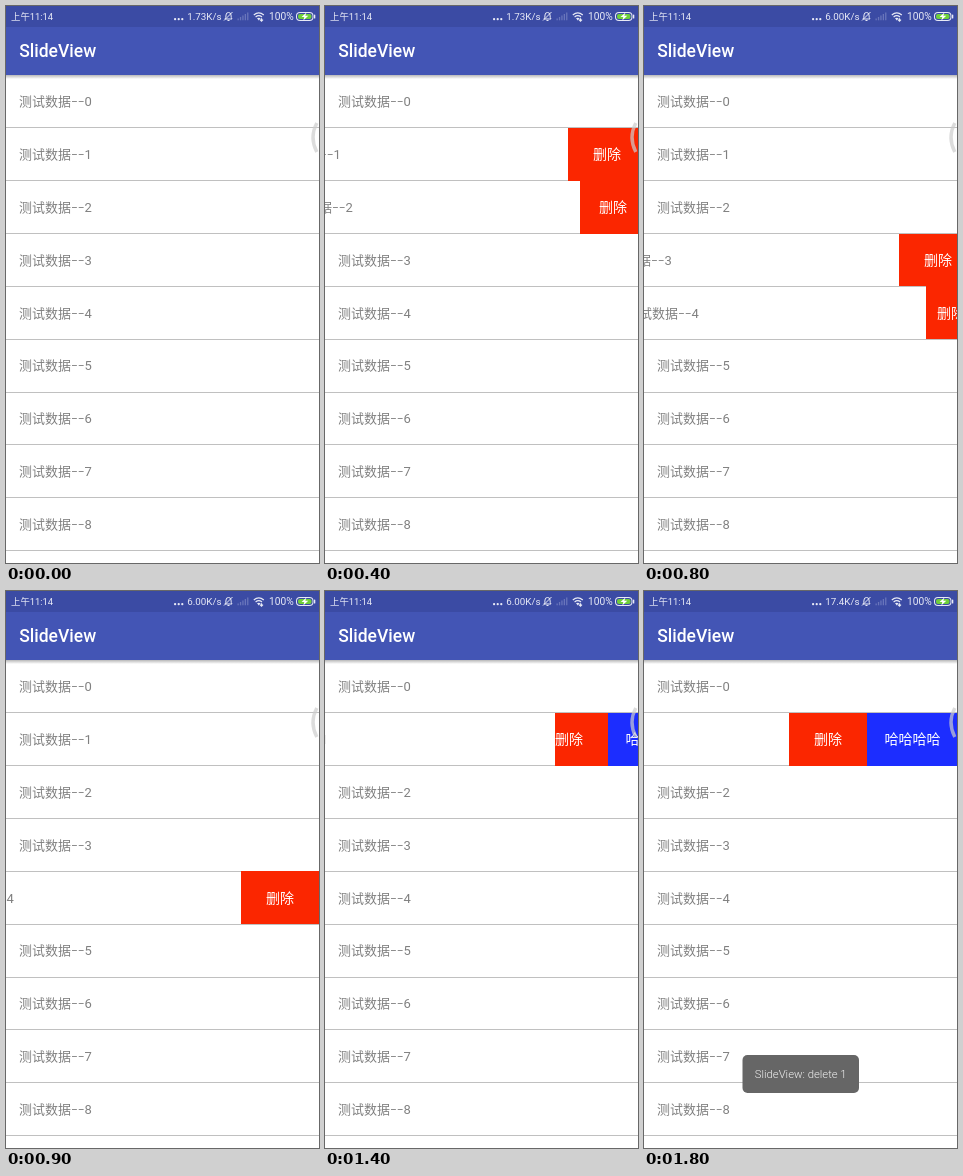
An HTML page with a canvas that plays this animation: 313x557 px, repeating every 1.9 s.

```html
<!DOCTYPE html>
<html lang="zh-CN">
<head>
<meta charset="utf-8">
<title>SlideView</title>
<style>
html, body { margin: 0; width: 100%; height: 100%; overflow: hidden; background: #fff; }
canvas { display: block; }
</style>
</head>
<body>
<canvas id="stage" width="313" height="557"></canvas>
<script>
const W = 313, H = 557, TICK = 100, TICKS = 19;
const LIST_TOP = 69, ROW = 52.85, RED_WIDTH = 78, BLUE_WIDTH = 90;
const FONT = 'Roboto, "Noto Sans CJK SC", "Noto Sans CJK", sans-serif';
const ctx = document.getElementById('stage').getContext('2d');

// Each swipe: row, first tick, distance pulled left on every tick from there.
const swipes = [
  { row: 0, start: 1, pull: [40, 74, 12] },
  { row: 1, start: 3, pull: [150, 70] },
  { row: 2, start: 4, pull: [58, 78, 24] },
  { row: 3, start: 6, pull: [90, 160, 58] },
  { row: 4, start: 8, pull: [31, 78, 46] },
  { row: 1, start: 11, pull: [16, 38, 60, 83, 125, 168, 168, 168] },
];

const rowTop = i => LIST_TOP + i * ROW;

function text(str, x, y, size, color, { weight = 400, align = 'left' } = {}) {
  ctx.font = `${weight} ${size}px ${FONT}`;
  ctx.textAlign = align;
  ctx.fillStyle = color;
  ctx.fillText(str, x, y);
}

function rect(x, y, w, h, color, radius = 0) {
  ctx.fillStyle = color;
  ctx.beginPath();
  ctx.roundRect(x, y, w, h, radius);
  ctx.fill();
}

function stroke(path, color, width) {
  ctx.strokeStyle = color;
  ctx.lineWidth = width;
  ctx.stroke(new Path2D(path));
}

function fill(path, color) {
  ctx.fillStyle = color;
  ctx.fill(new Path2D(path));
}

function statusBar(tick) {
  const speed = tick < 6 ? '1.73K/s' : tick < 16 ? '6.00K/s' : '17.4K/s';
  const light = '#e8eaf6', back = '#3b4ba4';
  rect(0, 0, W, 21, back);
  text('上午11:14', 5, 14, 9.4, light);
  for (let i = 0; i < 3; i++) rect(168 + i * 3.6, 12, 2.2, 2.2, light, 1);
  text(speed, 215.5, 14, 9.8, light, { align: 'right' });
  stroke('M219 13h7q-1-1-1-4q0-2.5-2.5-2.5t-2.5 2.5q0 3-1 4M221.5 14.5h2M218 14.5l8.5-8.5', light, 1);
  for (let i = 0; i < 5; i++) rect(231.5 + i * 2.4, 12.5 - i * 1.5, 1.3, 1.8 + i * 1.5, '#6975bb');
  stroke('M247.8 9q5-4.4 10 0M249.6 11q3.2-2.6 6.4 0M255.5 12.2v3M254 13.7l1.5 1.5l1.5-1.5', light, 1.2);
  fill('M251 12.3q1.8-1.2 3.6 0l-1.8 2.2z', light);
  text('100%', 263, 14, 10.2, light);
  rect(290, 6, 17.5, 9, light, 4);
  rect(291, 7, 15.5, 7, back, 3);
  rect(292, 8, 13.5, 5, '#6fd03a', 2);
  rect(308, 8.5, 1.3, 4, light, 0.6);
  fill('M300.5 6.5l-5 4.5h2.8l-1 3.5l5-4.7h-3z', '#fff');
}

function titleBar() {
  const shadow = ctx.createLinearGradient(0, 69, 0, 73);
  shadow.addColorStop(0, 'rgba(0,0,0,.28)');
  shadow.addColorStop(1, 'rgba(0,0,0,0)');
  rect(0, 69, W, 4, shadow);
  rect(0, 21, W, 48, '#4355b5');
  text('SlideView', 13.2, 51, 17.5, '#fff', { weight: 500 });
}

function menu({ row, start, pull }, tick) {
  const step = tick - start, offset = pull[step];
  const top = Math.round(rowTop(row)), height = Math.round(rowTop(row + 1)) - top;
  const full = RED_WIDTH + (row % 2 ? BLUE_WIDTH : 0);
  // Buttons lag behind the finger while opening and stick to the row while closing.
  const lag = step <= pull.indexOf(Math.max(...pull)) ? 0.7 : 1;
  const left = Math.round(W - full + lag * (full - offset));
  const baseline = rowTop(row) + 31.6;
  ctx.save();
  ctx.beginPath();
  ctx.rect(W - offset, top, offset, height);
  ctx.clip();
  rect(left, top, RED_WIDTH, height, '#fb2600');
  text('删除', left + 25, baseline, 14, '#fff');
  if (row % 2) {
    rect(left + RED_WIDTH, top, BLUE_WIDTH, height, '#1c2dff');
    text('哈哈哈哈', left + RED_WIDTH + 17.5, baseline, 14, '#fff');
  }
  ctx.restore();
}

function list(tick) {
  const active = swipes.filter(s => s.pull[tick - s.start]);
  for (let i = 0; i < 9; i++) {
    const swipe = active.find(s => s.row === i);
    const x = 13 - (swipe ? swipe.pull[tick - swipe.start] : 0);
    const baseline = rowTop(i) + 31.2;
    text('测试数据', x, baseline, 13, '#808080');
    text('−−', x + 52, baseline, 12, '#808080');
    text(i, x + 65.6, baseline, 13, '#808080');
    rect(0, Math.floor(rowTop(i + 1)), W, 1, '#c0c0c0');
  }
  active.forEach(s => menu(s, tick));
}

function toast(alpha) {
  ctx.globalAlpha = alpha;
  rect(98.5, 464, 116.5, 38, '#666', 5);
  text('SlideView: delete 1', 156.7, 487, 11.3, '#f0f0f0', { weight: 300, align: 'center' });
  ctx.globalAlpha = 1;
}

function draw(now) {
  const tick = Math.floor(now / TICK) % TICKS;
  rect(0, 0, W, H, '#fff');
  list(tick);
  titleBar();
  statusBar(tick);
  stroke('M310.8 117Q303.2 131.5 310.8 146', 'rgba(205,205,205,.7)', 3.4);
  if (tick >= 17) toast(tick === 17 ? 0.5 : 1);
}

const began = performance.now();
function loop() {
  draw(performance.now() - began);
  requestAnimationFrame(loop);
}
loop();
</script>
</body>
</html>
```
